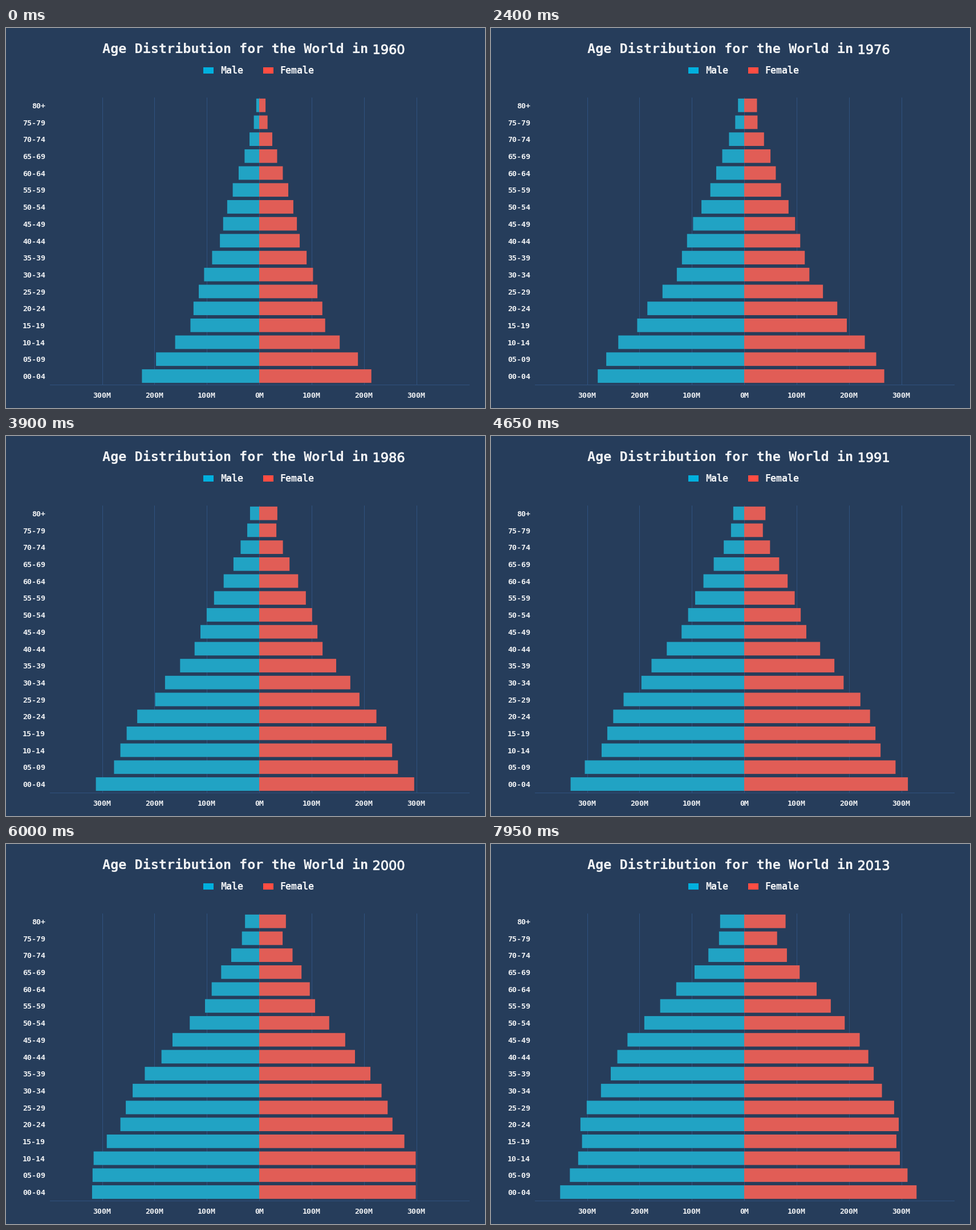
These frames come from a looping animation (840x667 px, 8 s). A matplotlib script:

```python
import numpy as np
import matplotlib.pyplot as plt
from matplotlib.animation import FuncAnimation
from matplotlib.patches import Rectangle
from matplotlib.patheffects import withStroke

W, H, DPI = 840, 667, 100
BACK, GRID, INK = "#263d5b", "#2f527f", "#f1f3f5"
MALE_BAR, FEMALE_BAR = "#21a3c4", "#e15d56"
CENTER, UNIT = 444.02, 91.83          # zero line and pixels per 100M
AXIS, BASE, PITCH = 626.2, 625.8, 29.7
START, FRAME_MS, STEPS = 1960, 50, 3  # a year lasts three frames
AGES = [f"{a:02d}-{a + 4:02d}" for a in range(0, 80, 5)] + ["80+"]

# Boys under five, as a bar length in pixels, at the turns of the curve.
BOYS = {1885: 140, 1895: 125, 1910: 123, 1920: 115.5, 1930: 136.5, 1940: 144,
        1945: 143, 1950: 166, 1955: 193, 1961: 209, 1966: 238, 1971: 252,
        1976: 257.5, 1981: 262.5, 1986: 287, 1991: 305, 1996: 296.5,
        2000: 293.5, 2005: 302, 2013: 323}


def cohort_size(group, year, female):
    """Survivors of one cohort: births less early deaths and Gompertz ageing."""
    born = year - 5 * group
    size = np.interp(born, list(BOYS), list(BOYS.values()))
    early = 0.13 * np.exp(-0.03 * (born - 1960)) * (1 - np.exp(-group / 2))
    ageing = (1 - 0.0115 * (born - 1940)) * 0.322 * np.exp(0.354 * (group - 12.1))
    if female:
        size *= np.interp(born, [1980, 1996], [0.955, 0.936])  # fewer girls born
        size *= np.interp(born, [1922, 1932], [1.05, 1])       # wartime losses of men
        ageing *= 0.7 - 0.005 * np.maximum(born - 1930, 0)
    return size * np.exp(-early - ageing)


def pyramid(year, female):
    sizes = cohort_size(np.arange(21), year, female)
    return [*sizes[:16], sizes[16:].sum()]


fig = plt.figure(figsize=(W / DPI, H / DPI), dpi=DPI, facecolor=BACK)
ax = fig.add_axes([0, 0, 1, 1])
ax.axis("off")


def label(x, y, text, px, ha="left", font="DejaVu Sans Mono", weight="bold"):
    return ax.text(x, y, text, fontsize=px * 72 / DPI, family=font, weight=weight,
                   color=INK, ha=ha, va="baseline")


def key(x, color, text):
    ax.add_patch(Rectangle((x, 69.3), 18, 10.4, color=color, lw=0))
    label(x + 30, 80.2, text, 16.6)


label(168.7, 44, "Age Distribution for the World in", 23.5)
year_text = label(642.6, 45.5, "", 22.4, font="DejaVu Sans", weight="normal")
year_text.set_path_effects([withStroke(linewidth=0.6, foreground=INK)])
key(346.3, "#00b0de", "Male")
key(450.6, "#ff4d43", "Female")

for step in range(-3, 4):
    x = CENTER + step * UNIT
    ax.plot([x, x], [121.5, AXIS], color=GRID, lw=0.72, zorder=1)
    label(x, 648.6, f"{abs(step) * 100}M", 13.3, "center")
ax.plot([77, 812], [AXIS, AXIS], color=GRID, lw=0.72, zorder=1)

rows = BASE - PITCH * (np.arange(17) + 0.5)
for y, age in zip(rows, AGES):
    label(69, y + 5.2, age, 13.4, "right")

style = dict(left=CENTER, height=0.8 * PITCH, linewidth=0, snap=False, zorder=2)
male_bars = ax.barh(rows, np.zeros(17), color=MALE_BAR, **style)
female_bars = ax.barh(rows, np.zeros(17), color=FEMALE_BAR, **style)
ax.set(xlim=(0, W), ylim=(H, 0))


def draw(frame):
    year = START + frame // STEPS
    year_text.set_text(str(year))
    for bar, length in zip(male_bars, pyramid(year, female=False)):
        bar.set_width(-length)
    for bar, length in zip(female_bars, pyramid(year, female=True)):
        bar.set_width(length)
    return [year_text, *male_bars, *female_bars]


anim = FuncAnimation(fig, draw, frames=8000 // FRAME_MS, interval=FRAME_MS,
                     repeat=True, repeat_delay=0)
plt.show()
```
